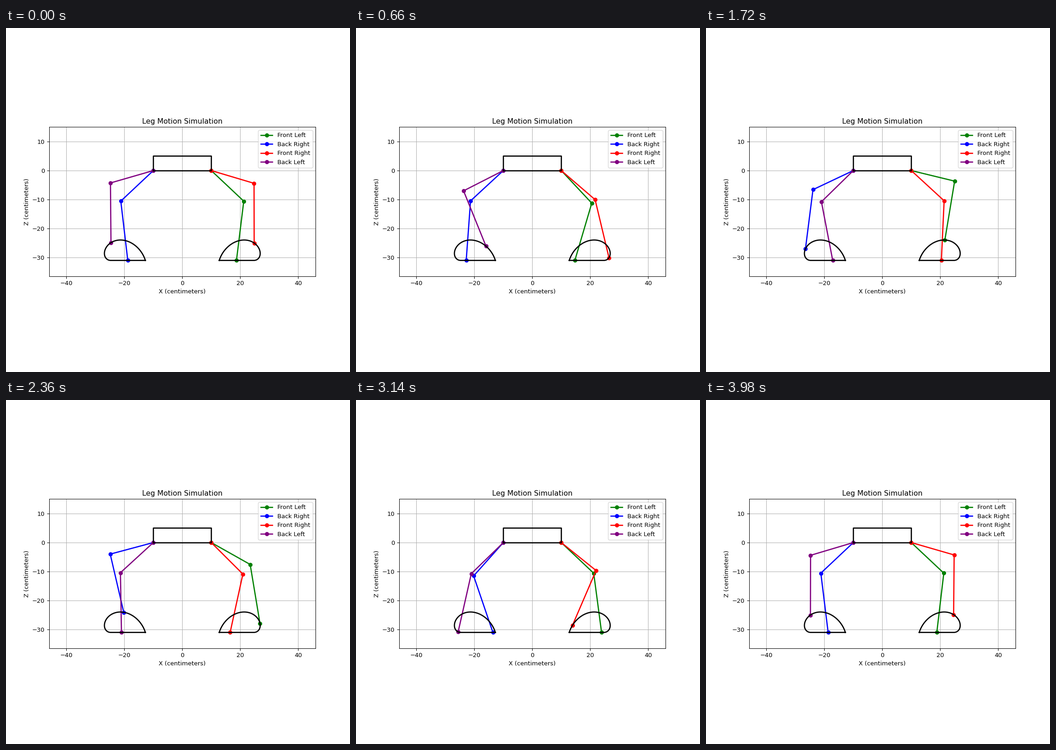
A matplotlib script that plays this animation: 748 px wide and 748 px high, repeating every 4000 ms.

```python
import numpy as np
import matplotlib.pyplot as plt
from matplotlib.animation import FuncAnimation
from math import comb

HIP = 10
THIGH, SHIN = 15.4, 20.6
GROUND = -31
HALF = 100                      # samples per swing and per stance
NEAR, STRIDE = 12.75, 12


def bezier(points, t):
    n = len(points) - 1
    return sum(comb(n, i) * (1 - t) ** (n - i) * t ** i * p
               for i, p in enumerate(points))


def foot_path():
    """Swing along a Bezier arc, then slide back along the ground."""
    t = np.linspace(0, 1, HALF)
    swing_x = NEAR + bezier([0, 2.24, 11.62, 17.11, 14.42, STRIDE], t)
    swing_z = GROUND + bezier([0, 7.33, 12.24, 3.5, 0, 0], t)
    stance_x = NEAR + STRIDE * (1 - t)
    return (np.concatenate([swing_x, stance_x]),
            np.concatenate([swing_z, np.full(HALF, GROUND)]))


def leg_points(x, z, side):
    """Hip, knee and foot, with the knee bent outwards."""
    dx = x - HIP
    reach = np.hypot(dx, z)
    bend = np.arccos((THIGH**2 + reach**2 - SHIN**2) / (2 * THIGH * reach))
    angle = np.arctan2(z, dx) + bend
    knee_x = HIP + THIGH * np.cos(angle)
    knee_z = THIGH * np.sin(angle)
    return side * np.array([HIP, knee_x, x]), [0, knee_z, z]


path_x, path_z = foot_path()
COUNT = len(path_x)

# label, colour, side, direction along the path, starting sample
LEGS = [
    ("Front Left", "green", 1, 1, 150),
    ("Back Right", "blue", -1, -1, 149),
    ("Front Right", "red", 1, 1, 50),
    ("Back Left", "purple", -1, -1, 49),
]

fig, ax = plt.subplots(figsize=(8, 8), dpi=93.5)
ax.set_aspect("equal")
ax.set_xlim(-46, 46)
ax.set_ylim(-36.5, 15)
ax.set_xlabel("X (centimeters)")
ax.set_ylabel("Z (centimeters)")
ax.set_title("Leg Motion Simulation")
ax.grid(True)

lines = [ax.plot([], [], "o-", color=color, lw=2, label=label)[0]
         for label, color, *_ in LEGS]
for side in (1, -1):
    ax.plot(side * path_x, path_z, color="black", lw=2)
ax.plot([-HIP, HIP, HIP, -HIP, -HIP], [0, 0, 5, 5, 0], color="black", lw=2)
ax.legend(loc="upper right")


def update(frame):
    for line, (_, _, side, step, start) in zip(lines, LEGS):
        k = (start + step * frame) % COUNT
        line.set_data(*leg_points(path_x[k], path_z[k], side))
    return lines


anim = FuncAnimation(fig, update, frames=COUNT, interval=20,
                     repeat=True, repeat_delay=0)
plt.show()
```
